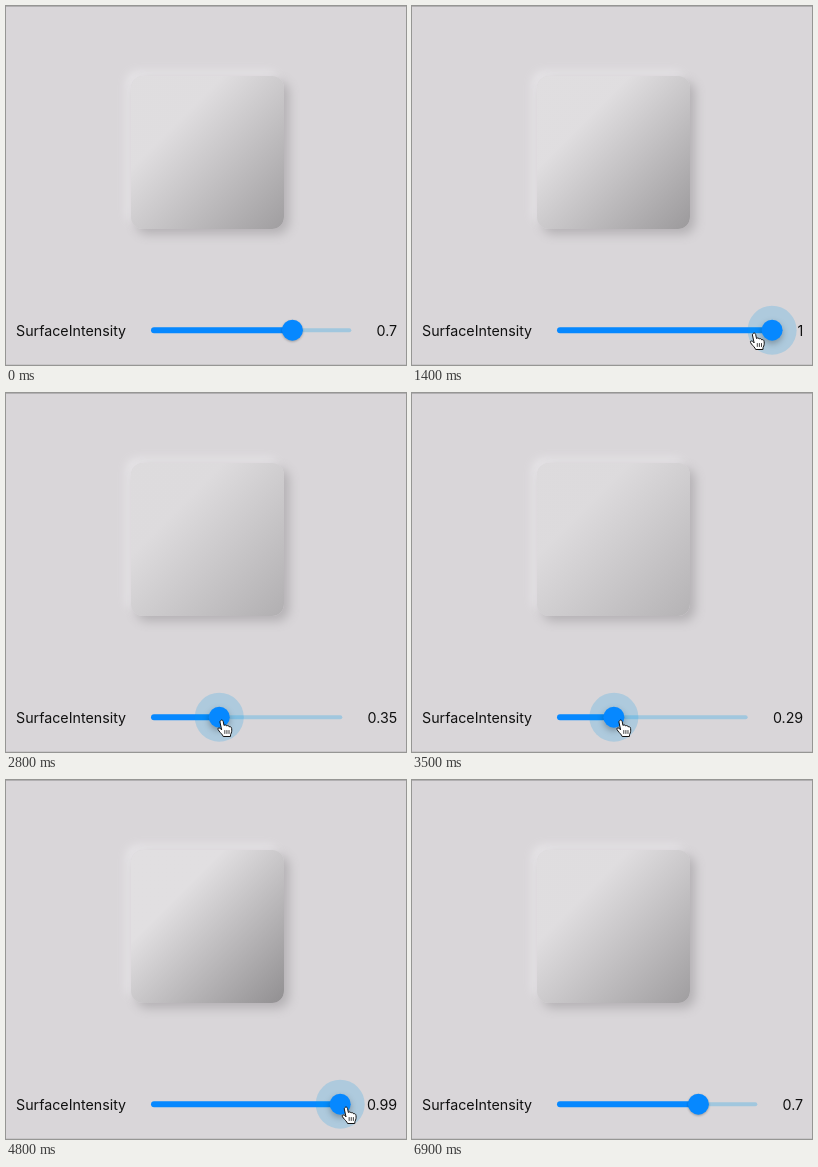
An HTML page for the animation above (7200 ms loop, 400 by 359 pixels).

```html
<!DOCTYPE html>
<html lang="en">
<head>
<meta charset="utf-8">
<title>SurfaceIntensity</title>
<style>
  html, body { margin: 0; width: 100%; height: 100%; overflow: hidden; background: #d9d6d9; }
  #tile {
    position: absolute; left: 125px; top: 70px; width: 153px; height: 153px; border-radius: 12px;
    box-shadow: 5px 5px 11px #b3b0b3, -5px -5px 10px #e7e5e8;
  }
  svg { position: absolute; left: 0; top: 0; }
  text { font: 14.25px Inter, Roboto, sans-serif; fill: #111; }
  .blue { fill: #0688ff; }
  .pale { fill: #009ceb; }
</style>
</head>
<body>
<div id="tile"></div>
<svg width="400" height="359">
  <rect width="400" height="1" fill="#b2b0b2"/>
  <rect y="358" width="400" height="1" fill="#c8c6c8"/>
  <text x="10" y="330.3">SurfaceIntensity</text>
  <text id="value" x="391.2" y="330.3" text-anchor="end"></text>
  <rect id="rest" class="pale" y="322.2" height="4" rx="2" opacity=".26"/>
  <rect id="fill" class="blue" x="145" y="321.2" height="6" rx="3"/>
  <circle id="halo" class="pale" cy="324.2" opacity=".2"/>
  <circle id="thumb" class="blue" cy="324.2" r="10.5"/>
  <g id="hand" stroke="#111" stroke-linecap="round" stroke-linejoin="round">
    <path fill="#fff" d="M-2 1.5C-1.5-.5.8-.5 1.2 1.5L2 5.5C2.5 4.6 4.4 4.8 4.7 6C5.4 5.2 7 5.6 7.2 6.8C8.2 6.3 9.5 7 9.6 8.4C10 11 9.6 12.5 8.6 14.5L8.4 16.5H1.2C.5 14.5-1.5 13-3 11C-4.6 9-4.4 8-3 8C-2 8-1.2 8.8-.6 9.6Z"/>
    <path stroke-width=".8" d="M2.8 10.5v3M4.9 10.5v3M7 10.5v3"/>
  </g>
</svg>
<script>
const LOOP = 7200, STEP = 100, LEFT = 145, RIGHT = 391.2, GAP = 25.3, START = .706;
const $ = id => document.getElementById(id);
const set = (id, attrs) => { for (const k in attrs) $(id).setAttribute(k, attrs[k]); };

// Smooth rise from 0 to 1 between two times.
function ease(t, from, to) {
  const p = Math.min(1, Math.max(0, (t - from) / (to - from)));
  return p * p * (3 - 2 * p);
}

// Drags of the thumb: from, to, value reached.
const drags = [[800, 1380, 1], [1700, 3080, .28], [3400, 4450, 1], [4700, 5770, START]];
const level = t => drags.reduce((v, [from, to, goal]) => v + (goal - v) * ease(t, from, to), START);

function drawTile(t) {
  // The surface darkens late but lightens at once.
  const k = Math.min(level(t), level(t - 400));
  const grey = l => `rgb(${l}, ${l - 2}, ${l})`;
  $("tile").style.background =
    `linear-gradient(135deg, ${grey(219 + 6 * k)} 30%, ${grey(195 - 50 * k)})`;
}

function drawSlider(t) {
  const v = level(t), press = ease(t, 500, 700) - ease(t, 6200, 6500);
  // The slider shares its row with the number, so its length follows the text width.
  $("value").textContent = Math.floor(v * 100 + 1e-6) / 100;
  const end = RIGHT - $("value").getComputedTextLength() - GAP;
  const x = LEFT + v * (end - LEFT);
  const drop = 1 + 2 * press;
  set("rest", { x, width: end - x });
  set("fill", { width: x - LEFT });
  set("halo", { cx: x, r: 24.5 * press });
  set("thumb", { cx: x });
  $("thumb").style.filter = `drop-shadow(0 ${drop}px ${drop}px rgba(0,0,0,.28))`;
}

function drawHand(t) {
  // The pointer runs slightly ahead of the thumb.
  const x = LEFT + 193 * level(t + 25) + 4.5;
  const y = 352 - 25 * ease(t, 500, 800) + 16 * ease(t, 4800, 5600) + 20 * ease(t, 6200, 6400);
  set("hand", {
    transform: `translate(${x} ${y})`,
    visibility: t >= 500 && t < 6400 ? "visible" : "hidden"
  });
}

function frame(now) {
  const t = Math.floor(now % LOOP / STEP) * STEP;
  drawTile(t);
  drawSlider(t);
  drawHand(t);
  requestAnimationFrame(frame);
}
frame(0);
</script>
</body>
</html>
```
